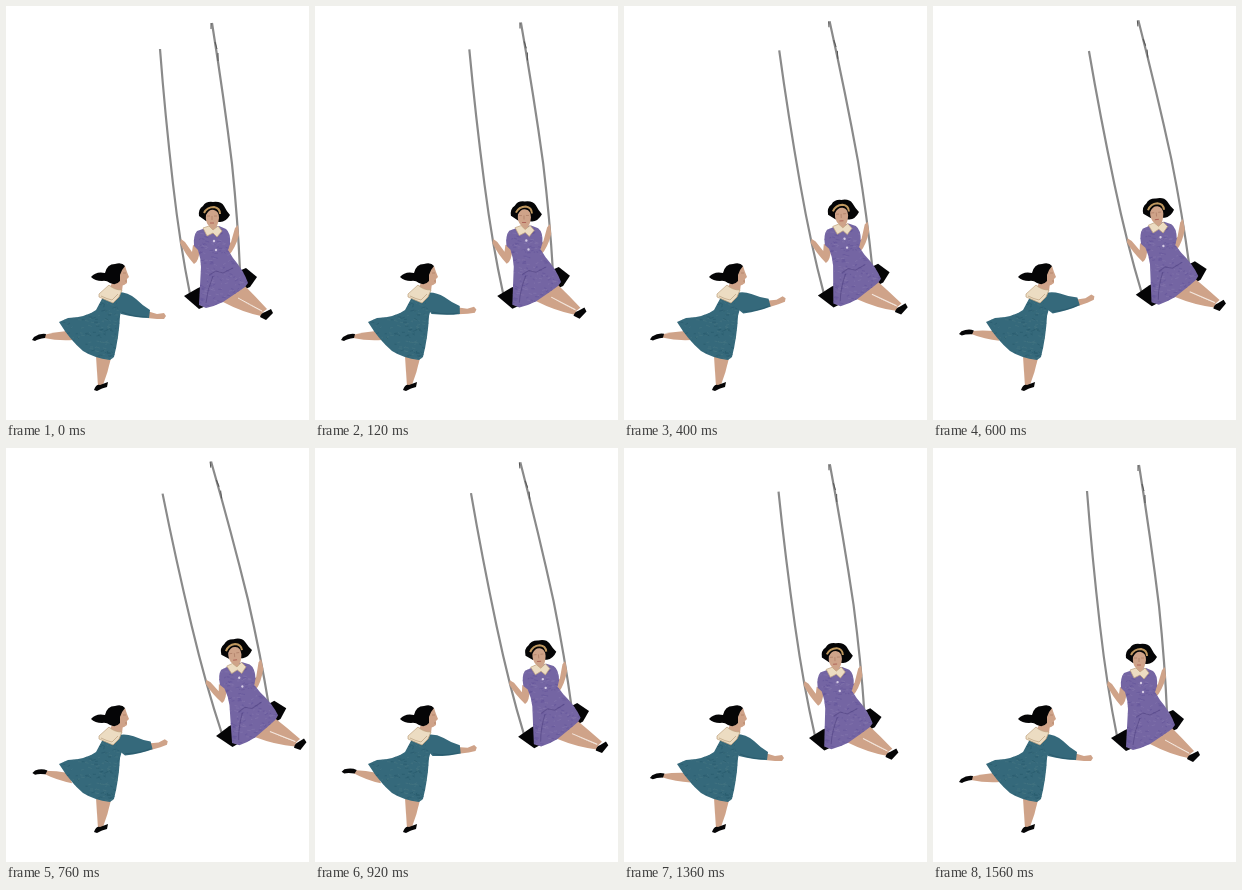
An HTML page for the animation above (1600 ms loop, 303x414 px).

```html
<!DOCTYPE html>
<html lang="en">
<head>
<meta charset="utf-8">
<title>Swing</title>
<style>
  html, body { margin: 0; height: 100%; overflow: hidden; background: #fff; }
  svg { display: block; width: 100vw; height: 100vh; }
  .skin { fill: #cfa389; }
  .shade { fill: none; stroke: #b08069; stroke-width: .8; }
  .ink { fill: #050506; }
  .cream { fill: #ecdcc2; stroke: #bfa27e; stroke-width: .7; }
  .teal { fill: #35697b; }
  .violet { fill: #7465a3; }
  .rope { fill: none; stroke: #8a8a8a; stroke-width: 2.2; }
  .fold { fill: none; stroke-width: 1; opacity: .5; }
</style>
</head>
<body>
<svg viewBox="0 0 303 414">
  <defs>
    <clipPath id="tealClip"><path id="tealDress" d="M97 291L115 286Q118 299 114 310Q113 331 108 351L104 354Q88 352 77 345Q64 334 53 316L62 312Q81 311 90 304Z"/></clipPath>
    <clipPath id="violetClip"><path id="violetDress" d="M200 222L191 225Q187 230 188 240L192 244Q195 253 195 261Q194 279 193 299L200 302Q209 300 217 296Q229 288 239 281L242 277Q238 265 227 252L222 244L224 238Q225 227 220 223L213 220Z"/></clipPath>
  </defs>

  <g id="runner">
    <g id="leg">
      <path class="skin" d="M37 329Q49 326 61 325L67 334Q52 335 38 332Z"/>
      <path class="ink" d="M26 334L28 331Q34 327 40 328L39 332Q32 333 29 335Z"/>
    </g>
    <path class="skin" d="M90 350L105 352Q102 366 97 379L92 380Q91 366 90 350Z"/>
    <path class="ink" d="M88 384Q90 378 94 379L102 376L101 381Q96 382 91 385Z"/>
    <use href="#tealDress" class="teal"/>
    <g id="tealSpecks" clip-path="url(#tealClip)"></g>
    <g id="arm">
      <path class="skin" d="M141 305L151 308L158 307L160 310L158 313L151 313L141 312Z"/>
      <path class="teal" d="M112 286Q122 286 130 293Q137 300 144 304L143 312Q131 312 115 308Q108 298 112 286Z"/>
      <path class="fold" stroke="#1f4e61" d="M116 306Q127 311 141 311"/>
    </g>
    <path class="skin" d="M107 275L117 277L116 285L111 287L104 281Z"/>
    <path class="cream" d="M93 288L103 279Q108 284 116 284L113 291L107 297Q100 294 93 291Z"/>
    <path class="fold" stroke="#a88862" d="M95 290Q101 293 106 294L112 288"/>
    <path class="skin" d="M110 261L119 260L121 266L123 271L121 273L121 277Q117 281 111 279Z"/>
    <path class="ink" d="M99 267Q101 258 109 258Q116 256 119 260Q116 263 114 269L114 275Q110 280 104 277Q100 274 96 275Q89 275 85 271Q90 265 99 267Z"/>
    <path class="shade" d="M117 267h3M119 275h2"/>
  </g>

  <g id="swing">
    <path class="rope" d="M154 43Q159 108 167 178Q174 239 184 288"/>
    <path class="rope" d="M206 17Q218 92 226 158Q232 216 234 265"/>
    <path fill="none" stroke="#555" d="M205 17v6M209 36l2 7M212 47v8"/>
    <path class="ink" d="M178 290L192 282L240 262L251 271L244 281L193 303Z"/>
    <path class="skin" d="M223 286L238 279Q250 291 261 303L257 306Q241 297 223 289Z"/>
    <path class="skin" d="M212 294L223 287Q241 298 257 306L255 310Q236 306 217 296Z"/>
    <path fill="none" stroke="#f5e9e0" d="M232 292Q245 299 256 305"/>
    <path class="ink" d="M254 311Q255 307 259 306L265 303L267 307L260 314Z"/>
    <path class="skin" d="M187 239L194 242Q193 256 188 258Q179 248 174 237L175 233L179 236L186 246Z"/>
    <path class="skin" d="M221 240L225 236L229 222L232 219L233 229Q229 243 223 249Z"/>
    <use href="#violetDress" class="violet"/>
    <g id="violetSpecks" clip-path="url(#violetClip)"></g>
    <path class="fold" stroke="#493a7b" stroke-width="2" d="M203 269l7-4l7 2l10-5M207 270Q201 284 200 297"/>
    <path class="ink" d="M193 210Q192 203 197 200Q200 195 207 196Q215 195 218 200Q221 206 224 209Q220 216 214 216L200 215Z"/>
    <path class="skin" d="M200 209Q203 203 208 204Q213 205 213 212Q212 219 210 221L211 225L203 225L203 220Q199 216 200 209Z"/>
    <path fill="none" stroke="#c0985f" stroke-width="2" d="M198 207Q201 201 208 201Q214 202 214 208"/>
    <path class="shade" d="M201 210h3M208 210h3M206 210v4"/>
    <path fill="none" stroke="#b0665a" d="M204 217h4"/>
    <path class="cream" d="M197 222L203 220L207 224L212 220L216 225L211 231L207 227L201 230Z"/>
    <g fill="#d5cce4"><circle cx="208" cy="235" r="1.2"/><circle cx="210" cy="244" r="1.2"/></g>
  </g>
</svg>
<script>
  const LOOP = 1600, STEP = 40, PEAK = 760, END = 1560;
  const part = id => document.getElementById(id);

  let seed = 7;
  const random = () => (seed = seed * 16807 % 2147483647) / 2147483647;

  // Soft fabric grain, clipped to a dress
  function addSpecks(id, x, y, w, h, colors) {
    let marks = '';
    for (let i = 0; i < 260; i++) {
      const px = x + random() * w, py = y + random() * h;
      marks += `<path d="M${px} ${py}l${1 + random() * 3} ${random() * 3 - 1.5}" stroke="${colors[i % 2]}" opacity=".6"/>`;
    }
    part(id).innerHTML = marks;
  }

  // Half sine wave lasting 1120 ms
  const hump = (time, start) => {
    const p = (time - start) / 1120;
    return p > 0 && p < 1 ? Math.sin(Math.PI * p) : 0;
  };

  const rotate = (id, angle, x, y) =>
    part(id).setAttribute('transform', `rotate(${angle} ${x} ${y})`);

  function draw(now) {
    const time = Math.floor(now % LOOP / STEP) * STEP;
    const reach = Math.max(0, Math.min(time / PEAK, (END - time) / (END - PEAK)));
    rotate('swing', -6.9 * reach ** 1.1, 177, 23);
    rotate('arm', -25 * hump(time, 0), 116, 297);
    rotate('leg', 16.5 * hump(time, 380), 62, 331);
    requestAnimationFrame(draw);
  }

  addSpecks('tealSpecks', 53, 286, 66, 68, ['#285a6c', '#477783']);
  addSpecks('violetSpecks', 187, 221, 56, 81, ['#63549a', '#8577ae']);
  draw(performance.now());
</script>
</body>
</html>
```
